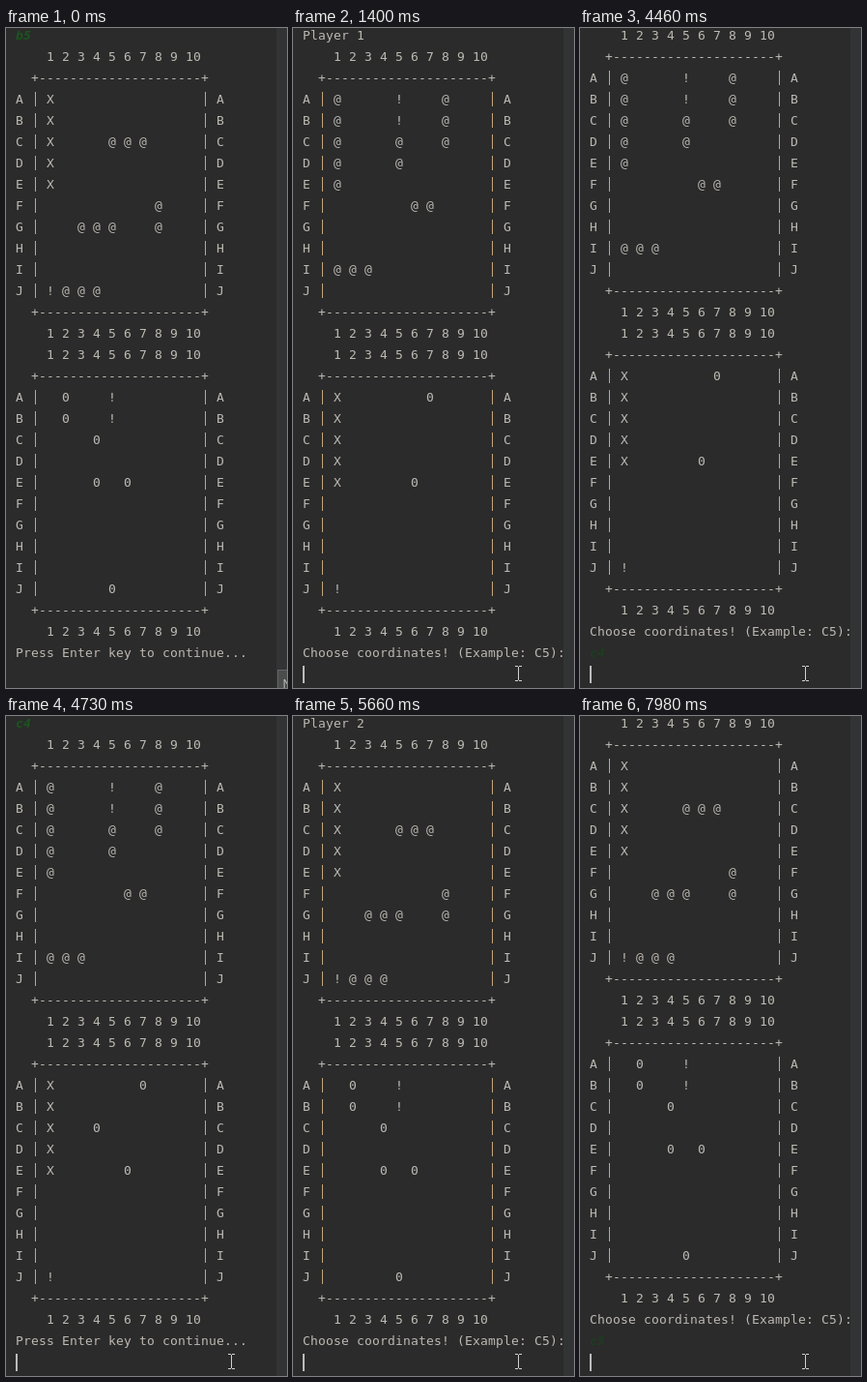
Animation of 291 by 682 pixels, one loop 8 s. Source, as an HTML page with a canvas:

```html
<!DOCTYPE html>
<html>
<head>
<meta charset="utf-8">
<style>
html, body { margin: 0; width: 100%; height: 100%; overflow: hidden; background: #2b2b2b; }
canvas { display: block; }
</style>
</head>
<body>
<canvas id="stage" width="291" height="682"></canvas>
<script>
const ctx = document.getElementById('stage').getContext('2d');
const LOOP = 8000, CELL = 8, LINE = 22, LEFT = 10, LAST_ROW = 30;
const FONT = '13px "DejaVu Sans Mono", "Liberation Mono", monospace';
const TEXT = '#bdb9b3', BAR = '#c4a67e', INPUT = '#1a561e', FADED_INPUT = '#1e3d20';

const header = '    1 2 3 4 5 6 7 8 9 10';
const rule = '  +' + '-'.repeat(21) + '+';

function board(marks) {
  const grid = marks.split('/').map((row, i) => {
    const letter = 'ABCDEFGHIJ'[i];
    return `${letter} | ${[...row.padEnd(10)].join(' ')} | ${letter}`;
  });
  return [header, rule, ...grid, rule, header];
}
const view = (top, own, enemy, prompt) => [top, ...board(own), ...board(enemy), prompt];

const fleet1 = '@   !  @/@   !  @/@   @  @/@   @/@/     @@///@@@/';
const shots1 = 'X     0/X/X/X/X    0/////!';
const shots1Next = 'X     0/X/X  0/X/X    0/////!';
const fleet2 = 'X/X/X   @@@/X/X/       @/  @@@  @///!@@@';
const shots2 = ' 0  !/ 0  !/   0//   0 0/////    0';
const choose = 'Choose coordinates! (Example: C5):';
const proceed = 'Press Enter key to continue...';

// Lines starting with ~ are typed input, ^ marks the faded variant.
const result2 = view('~b5', fleet2, shots2, proceed);
const turn1 = view('Player 1', fleet1, shots1, choose);
const result1 = view('~c4', fleet1, shots1Next, proceed);
const turn2 = view('Player 2', fleet2, shots2, choose);
const partial = header.slice(0, 18);

// Each scene: start time, lines, last line, spans in which the caret is hidden.
const scenes = [
  [0, result2, '', [[0, 470]]],
  [1140, [...result2.slice(2), '', 'Player 1'], partial],
  [1340, turn1, '', [[1940, 2400], [2930, 3460]]],
  [3600, turn1, '~c'],
  [4190, turn1, '~c4'],
  [4460, [...turn1.slice(1), '^c4'], ''],
  [4660, result1, ''],
  [5320, [...result1.slice(2), '', 'Player 2'], partial],
  [5520, turn2, '', [[6450, 6920]]],
  [7180, turn2, '~c'],
  [7510, turn2, '~c5'],
  [7980, [...turn2.slice(1), '^c5'], '']
];

function rect(color, x, y, w, h) {
  ctx.fillStyle = color;
  ctx.fillRect(x, y, w, h);
}

function drawLine(line, row) {
  const typed = /^[~^]/.test(line);
  const color = !typed ? TEXT : line[0] === '^' ? FADED_INPUT : INPUT;
  const y = 8 + row * LINE;
  ctx.font = typed ? 'italic bold ' + FONT : FONT;
  [...line.slice(typed ? 1 : 0)].forEach((ch, i) => {
    const x = LEFT + CELL / 2 + i * CELL;
    if (ch === '|') return rect(BAR, x, y - 8, 1, 15);
    ctx.fillStyle = color;
    ctx.fillText(ch, x, y + 4);
  });
}

function drawPointer(t) {
  if (t < 210) return;
  const rest = 1 - Math.min(1, (Math.floor((t - 210) / 65) + 1) / 5);
  const x = Math.round(233 + 5 * rest), y = Math.round(667 + 18 * rest);
  rect('#d0d0d0', x, y - 7, 1, 14);
  for (const end of [y - 8, y + 7]) {
    rect('#d0d0d0', x - 3, end, 3, 1);
    rect('#d0d0d0', x + 1, end, 3, 1);
  }
}

function draw(t) {
  rect('#2b2b2b', 0, 0, 291, 682);
  rect('#313335', 280, 0, 11, 682);
  ctx.textAlign = 'center';
  const [, lines, last, hidden = []] = scenes.filter(s => s[0] <= t).pop();
  lines.forEach(drawLine);
  drawLine(last, LAST_ROW);
  if (!hidden.some(([from, to]) => t >= from && t < to)) {
    const n = last.replace('~', '').length;
    rect('#bbbbbb', n ? LEFT - 1 + n * CELL : LEFT, 659, 2, 18);
  }
  drawPointer(t);
  if (t < 70) {
    rect('#636565', 281, 663, 10, 19);
    rect('#4b4d4d', 282, 664, 9, 18);
    ctx.font = '12px "Noto Sans", sans-serif';
    ctx.fillStyle = '#bbbbbb';
    ctx.fillText('N', 291, 682);
  }
}

function tick() {
  draw(performance.now() % LOOP);
  requestAnimationFrame(tick);
}
tick();
</script>
</body>
</html>
```
